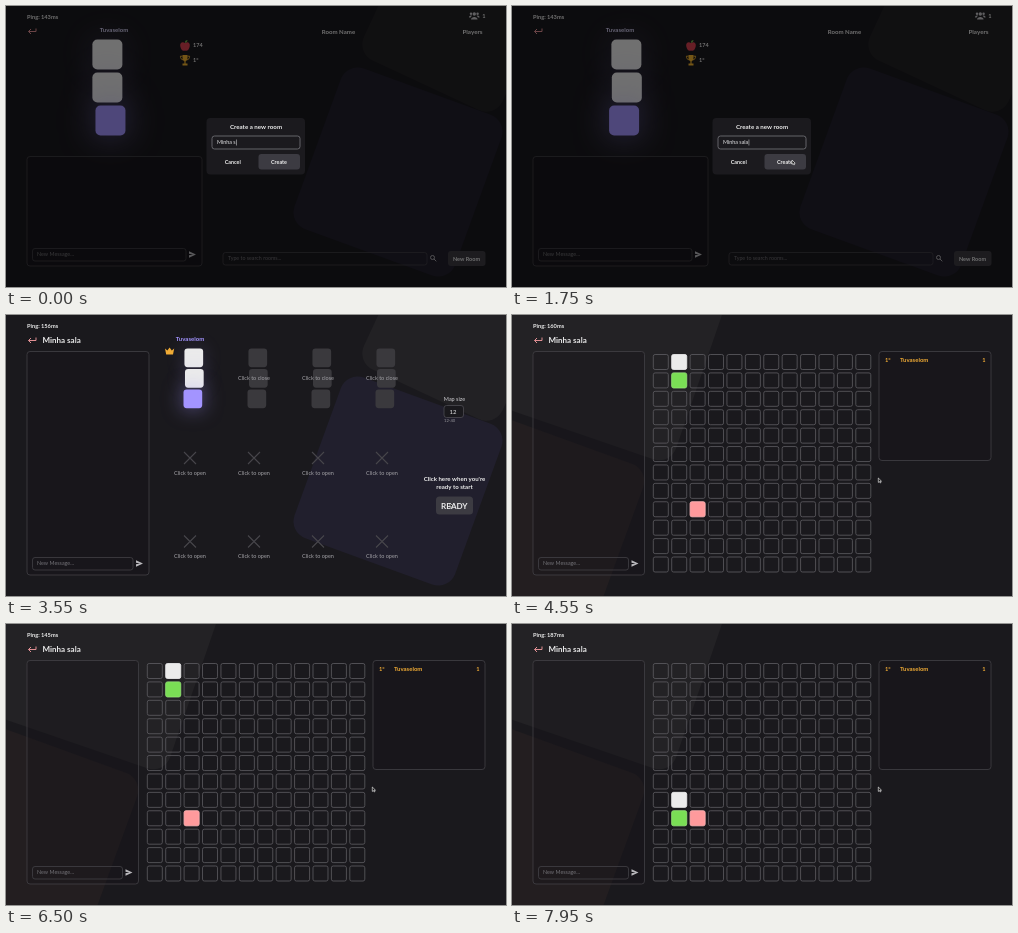
Recreate the animation shown at these times as an HTML page with a canvas. Size 500 by 281 pixels, loop 8 s.

```html
<!DOCTYPE html>
<html lang="en">
<head>
<meta charset="utf-8">
<title>Snake rooms</title>
<style>
html, body { margin: 0; width: 100%; height: 100%; overflow: hidden; background: #1a191d; }
canvas { display: block; width: 500px; height: 281px; }
</style>
</head>
<body>
<canvas></canvas>
<script>
const LOOP = 8000, ROOM_AT = 1900, GAME_AT = 3600;
const PLAYER = 'Tuvaselom';
const BG = '#1a191d', LINE = '#424146', WHITE = '#ebebeb', PURPLE = '#a394ff', GOLD = '#f0ab35', ROSE = '#e08f93';
const canvas = document.querySelector('canvas');
const ctx = canvas.getContext('2d');
const ratio = window.devicePixelRatio || 1;
canvas.width = 500 * ratio;
canvas.height = 281 * ratio;

function text(str, x, y, size, color = WHITE, align = 'left', weight = 700) {
  ctx.font = `${weight} ${size}px Lato, "Open Sans", sans-serif`;
  ctx.textAlign = align;
  ctx.textBaseline = 'alphabetic';
  ctx.fillStyle = color;
  ctx.fillText(str, x, y + size * 0.35);
}

function box(x, y, w, h, r, fill, stroke, width = 0.8) {
  ctx.beginPath();
  ctx.roundRect(x, y, w, h, r);
  if (fill) { ctx.fillStyle = fill; ctx.fill(); }
  if (stroke) { ctx.strokeStyle = stroke; ctx.lineWidth = width; ctx.stroke(); }
}

function path(d, x, y, fill, stroke, width = 1) {
  const shape = new Path2D(d);
  ctx.save();
  ctx.translate(x, y);
  if (fill) { ctx.fillStyle = fill; ctx.fill(shape); }
  if (stroke) { ctx.strokeStyle = stroke; ctx.lineWidth = width; ctx.stroke(shape); }
  ctx.restore();
}

function tiltedSquare(cx, cy, side, degrees, color) {
  ctx.save();
  ctx.translate(cx, cy);
  ctx.rotate(degrees * Math.PI / 180);
  box(-side / 2, -side / 2, side, side, 18, color);
  ctx.restore();
}

// Value of the last [time, value] step already reached.
const stepAt = (steps, t) => steps.filter(s => t >= s[0]).pop()[1];

function header(t, title) {
  const ping = stepAt([[0, 143], [1900, 151], [2700, 148], [3500, 156], [4500, 160],
    [5500, 171], [6500, 145], [7500, 187]], t);
  text(`Ping: ${ping}ms`, 21, 10.7, 5.7);
  path('M8 -3V0H0.5M3 -2.5L0.5 0L3 2.5', 22, 25.5, null, ROSE);
  if (title) text(title, 36.5, 25.5, 8);
}

function chat(y, right) {
  box(21, y, right - 21, 260 - y, 3, 'rgba(20,19,23,.35)', LINE);
  box(26.5, 242.5, right - 42.5, 12.5, 2.5, null, LINE);
  text('New Message...', 31, 248.5, 5.4, '#737278', 'left', 400);
  path('M0 -3.2L7 0L0 3.2V0.7L4 0L0 -0.7Z', right - 13, 248.5, '#b9b8bc');
}

// Three stacked blocks swaying sideways, each trailing the one above.
function swayingSnake(cx, top, size, gap, phase, colors, glow) {
  colors.forEach((color, i) => {
    const sway = size * 0.235 * Math.sin((phase - i * 40) * Math.PI / 180);
    ctx.save();
    if (glow) {
      ctx.shadowColor = i === 2 ? 'rgba(163,148,255,.55)' : 'rgba(163,148,255,.2)';
      ctx.shadowBlur = size * 1.1 * ratio;
    }
    box(cx + sway - size / 2, top + i * gap, size, size, size / 6, color);
    ctx.restore();
  });
}

const ownColors = [WHITE, WHITE, PURPLE];
const ghostColors = Array(3).fill('#3a393d');

function backdropRight() {
  tiltedSquare(452, 10, 153, 25, '#222124');
  tiltedSquare(392, 166, 171, 20, '#211f2d');
}

function lobby(t) {
  backdropRight();
  header(t);
  text(PLAYER, 108, 24, 6, '#d8d3f5', 'center');
  swayingSnake(108, 33.5, 30, 33, -70 + t * 90 / 850, ownColors, true);

  path('M5 2.5C2 0.5 -0.5 3 0.3 6C1 9.5 3 11 5 10C7 11 9 9.5 9.7 6C10.5 3 8 0.5 5 2.5Z', 174, 34.5, '#d8414f');
  path('M5 2.5C4.5 0.5 6 -0.5 7.5 -0.5C7.5 1 6.5 2 5 2.5Z', 174, 34.5, '#6fae4b');
  path('M2.5 0H7.5V3C7.5 5 6.3 6 5.6 6.3V8.5H7.5V10.5H2.5V8.5H4.4V6.3C3.7 6 2.5 5 2.5 3Z', 174, 49, '#f3b52f');
  path('M2.5 1.2H0.4C0.4 3.5 1.5 4.6 3 4.8M7.5 1.2H9.6C9.6 3.5 8.5 4.6 7 4.8', 174, 49, null, '#f3b52f', 0.9);
  text('174', 187, 38.8, 5.5);
  text('1°', 187, 54.2, 5.5);

  text('Room Name', 332.5, 25.5, 6.1, WHITE, 'center');
  text('Players', 466.5, 25.5, 6.3, WHITE, 'center');
  for (const [x, y, r] of [[468.3, 8, 1.7], [465, 7.7, 1.2], [471.6, 7.7, 1.2]]) {
    ctx.beginPath();
    ctx.arc(x, y, r, 0, 7);
    ctx.fillStyle = '#c9c8cc';
    ctx.fill();
  }
  path('M2 6.5C2 3 8.6 3 8.6 6.5ZM0 4.5C0 2.6 1.5 2 3 2.6L1.6 4.5ZM10.6 4.5C10.6 2.6 9.1 2 7.6 2.6L9 4.5Z', 463, 7, '#c9c8cc');
  text('1', 476.2, 10.2, 5.7);

  chat(150.5, 196);
  box(217, 246.5, 204, 12.5, 2.5, null, LINE);
  text('Type to search rooms...', 222, 252.6, 5.3, '#737278', 'left', 400);
  path('M4 2A2 2 0 1 1 0 2A2 2 0 1 1 4 2M3.5 3.5L5.8 5.8', 424.5, 249.5, null, '#b9b8bc', 0.9);
  box(442, 245, 37.5, 15, 3, '#3c3b42');
  text('New Room', 460.5, 252.6, 5.5, WHITE, 'center');

  ctx.fillStyle = 'rgba(0,0,0,.52)';
  ctx.fillRect(0, 0, 500, 281);
  createDialog(t);
}

function createDialog(t) {
  box(200.5, 112, 98.5, 56.5, 4, '#1b1a1e');
  text('Create a new room', 250, 121, 6.2, WHITE, 'center');
  box(206, 130, 88, 13, 2.5, null, '#77767c');
  const length = stepAt([[0, 7], [100, 8], [200, 9], [300, 10]], t);
  text('Minha sala'.slice(0, length), 211, 136.4, 5.4, '#e4e4e6', 'left', 400);
  if (t < 300 || (t - 300) % 1000 < 500) {
    const x = 211 + ctx.measureText('Minha sala'.slice(0, length)).width + 0.4;
    ctx.fillRect(x, 133.5, 0.5, 6);
  }
  text('Cancel', 226.7, 155.7, 5.4, WHITE, 'center');
  box(252.5, 148, 41.5, 15.5, 3, '#3c3b42');
  text('Create', 273, 155.7, 5.4, WHITE, 'center');
}

function room(t) {
  backdropRight();
  header(t, 'Minha sala');
  chat(36.5, 143);
  const phase = -12 + (t - 2300) * 90 / 850;
  for (let slot = 0; slot < 12; slot++) {
    const x = 184 + slot % 4 * 64, row = Math.floor(slot / 4);
    if (row) {
      const y = 59.5 + row * 83.5;
      path('M-6 -6L6 6M6 -6L-6 6', x, y, null, '#47464b', 1.1);
      text('Click to open', x, y + 15, 5.5, '#a3a2a7', 'center', 400);
    } else {
      swayingSnake(x, 33.5, 18.7, 20.5, phase, slot ? ghostColors : ownColors, !slot);
      if (slot) text('Click to close', x, 63.3, 5.5, '#a3a2a7', 'center', 400);
    }
  }
  text(PLAYER, 184, 24, 6, PURPLE, 'center');
  path('M0 1L2.4 3L4.6 0L6.8 3L9.2 1L8 7H1.2Z', 159, 32.5, GOLD);

  text('Map size', 448.5, 84, 5.5, '#d4d3d7', 'center', 400);
  box(438, 90.5, 19.5, 12, 2.5, BG, '#4d4c52');
  text('12', 447, 96.6, 6, WHITE, 'center', 400);
  text('12-40', 438, 105.6, 4.2, '#98979c', 'left', 400);
  text("Click here when you're", 448.5, 164, 6.1, WHITE, 'center');
  text('ready to start', 448.5, 172, 6.1, WHITE, 'center');
  box(430, 181.5, 37, 18, 3.5, '#3c3b42');
  text('READY', 448.3, 190.7, 8.1, WHITE, 'center');
}

function game(t) {
  tiltedSquare(87, 4, 230, 19, '#232225');
  tiltedSquare(-10, 224, 230, 20, '#231e20');
  header(t, 'Minha sala');
  chat(36.5, 132.5);

  const pitch = 18.41, moves = Math.max(0, Math.floor((t - 7100) / 130) + 1);
  const cell = (col, row, fill, stroke) =>
    box(141.3 + col * pitch, 39.5 + row * pitch, 15, 15, 1.8, fill, stroke);
  for (let i = 0; i < 144; i++) cell(i % 12, Math.floor(i / 12), null, '#5f5e63');
  cell(2, 8, '#ff9a9c', '#ffb0b1');
  cell(1, moves, WHITE, WHITE);
  cell(1, moves + 1, '#7ade55', '#8ee56e');

  box(367, 36.5, 112, 109, 3, 'rgba(20,19,23,.35)', LINE);
  text('1°', 373, 45.3, 5.7, GOLD);
  text(PLAYER, 388, 45.3, 6, GOLD);
  text('1', 473.5, 45.3, 5.7, GOLD, 'right');
}

// Waypoints: time, x, y.
const pointerPath = [[1600, 284, 141], [1750, 280, 154], [1950, 280, 154], [2250, 300, 137.5],
  [2650, 300, 137.5], [3250, 444, 188], [3650, 444, 188], [4150, 366.3, 163]];

function pointer(t) {
  if (t < pointerPath[0][0]) return;
  const i = pointerPath.findLastIndex(p => t >= p[0]);
  const a = pointerPath[i], b = pointerPath[i + 1] || a;
  const p = b === a ? 0 : (t - a[0]) / (b[0] - a[0]);
  const e = p * p * (3 - 2 * p);
  path('M0 0V4.4L1.1 3.5L1.9 5L2.6 4.6L1.9 3.2H3.2Z',
    a[1] + (b[1] - a[1]) * e, a[2] + (b[2] - a[2]) * e, '#111', '#fff', 0.6);
}

function draw(now) {
  const t = now % LOOP;
  ctx.setTransform(ratio, 0, 0, ratio, 0, 0);
  ctx.fillStyle = BG;
  ctx.fillRect(0, 0, 500, 281);
  (t < ROOM_AT ? lobby : t < GAME_AT ? room : game)(t);
  pointer(t);
}

const start = performance.now();
function tick() {
  draw(performance.now() - start);
  requestAnimationFrame(tick);
}
tick();
</script>
</body>
</html>
```
